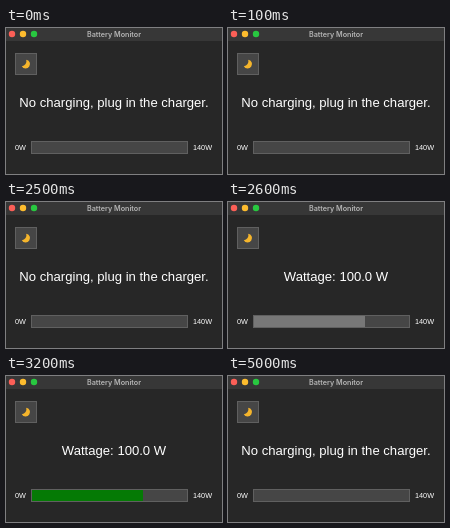
Write an HTML page that moves like this. It is 216 px wide and 146 px high and loops after 8000 ms.

```html
<!DOCTYPE html>
<html lang="en">
<head>
<meta charset="utf-8">
<title>Battery Monitor</title>
<style>
  html, body { margin: 0; width: 100%; height: 100%; overflow: hidden; background: #272727; }
  svg { display: block; width: 100%; height: 100%; }
  text { font-family: "Liberation Sans", Arial, sans-serif; fill: #fff; }
  .title { font: 600 7.2px Inter, sans-serif; fill: #b4b4b4; text-anchor: middle; }
  .message { font-size: 13.1px; text-anchor: middle; }
  .label { font-size: 7.3px; }
  .box { fill: #464646; stroke: #606060; }

  /* plugged in from 2.6 s to 5 s; the bar turns green at 2.7 s */
  .idle { animation: idle 8s step-end infinite; }
  .charging { animation: charging 8s step-end infinite; }
  .level { animation: level 8s step-end infinite; }
  @keyframes idle {
    0%, 62.5% { visibility: visible; }
    32.5% { visibility: hidden; }
  }
  @keyframes charging {
    0%, 62.5% { visibility: hidden; }
    32.5% { visibility: visible; }
  }
  @keyframes level {
    0% { fill: #777; }
    33.75% { fill: #057a05; }
  }
</style>
</head>
<body>
<svg viewBox="0 0 216 146">
  <rect width="216" height="146" fill="#272727"/>
  <rect width="216" height="13" fill="#373737"/>
  <circle cx="6" cy="6" r="3.2" fill="#fb5f57"/>
  <circle cx="17" cy="6" r="3.2" fill="#fdbc2e"/>
  <circle cx="28" cy="6" r="3.2" fill="#28c840"/>
  <text class="title" x="108" y="8.6">Battery Monitor</text>

  <rect class="box" x="9.5" y="25.5" width="21" height="21"/>
  <path d="M20.2 31.7A4.4 4.4 0 1 1 15.8 38.2A5 5 0 0 0 20.2 31.7Z" fill="#f5b52c"/>

  <text class="message idle" x="108" y="79">No charging, plug in the charger.</text>
  <text class="message charging" x="108" y="79">Wattage: 100.0 W</text>

  <text class="label" x="9" y="122">0W</text>
  <rect class="box" x="25.5" y="113.5" width="156" height="12"/>
  <g class="charging">
    <rect class="level" x="26" y="114" width="111" height="11"/>
  </g>
  <text class="label" x="187" y="122">140W</text>
</svg>
</body>
</html>
```
